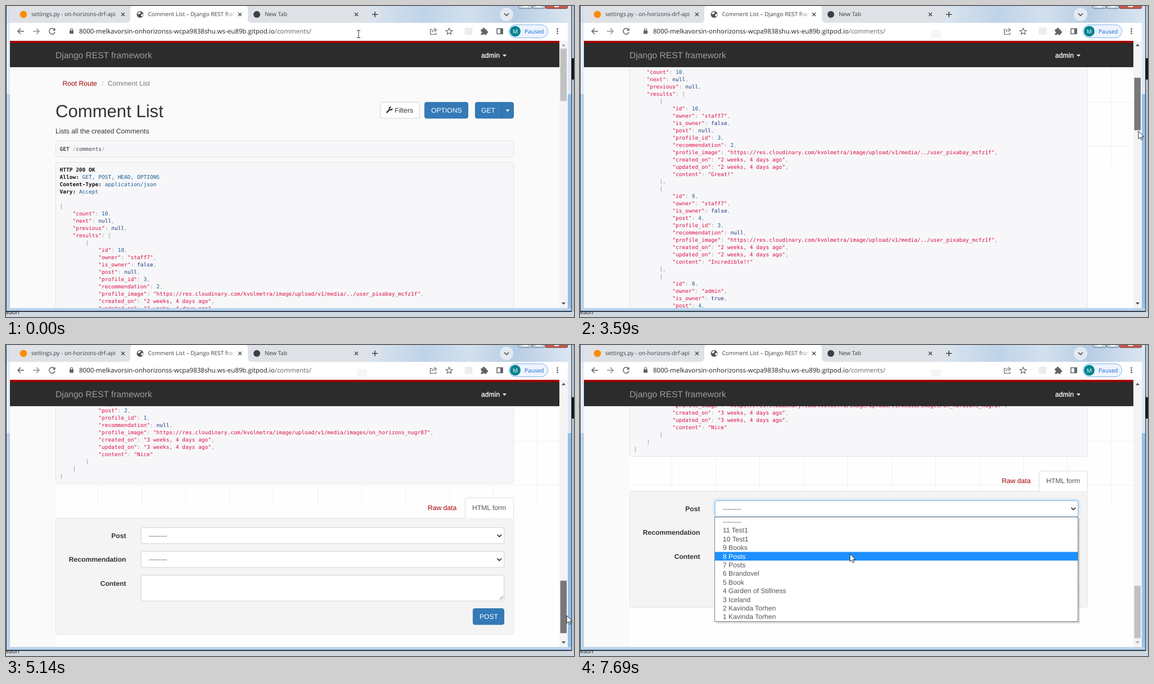
Animation of 1010x554 px, one loop 8 s. Source, as an HTML page:

```html
<!DOCTYPE html>
<html lang="en">
<head>
<meta charset="utf-8">
<title>Comment List</title>
<style>
  html, body { margin: 0; width: 100%; height: 100%; overflow: hidden; background: #fafafa; }
  svg { display: block; width: 1010px; height: 554px; }
  text { font: 12.13px "Liberation Sans", Arial, sans-serif; white-space: pre; text-rendering: geometricPrecision; }
  .ui { font: 10.1px "Open Sans", "Noto Sans", sans-serif; }
  .url { font: 11.5px "Open Sans", "Noto Sans", sans-serif; }
  .code { font: 9.53px "DejaVu Sans Mono", monospace; }
  .code .s { fill: #d14; }
  .code .n { fill: #195f91; }
  .code .k { fill: #1e347b; }
  .code .p { fill: #93a1a1; }
  .b { font-weight: bold; }
  .brand { font-size: 15.55px; }
  .h1 { font-size: 31.1px; }
  .end { text-anchor: end; }
  .line { fill: none; stroke: #5f6368; stroke-width: 1.5; }
</style>
</head>
<body>
<svg id="stage" viewBox="0 0 1010 554"></svg>
<script>
const LOOP = 8000, ROW = 15.4, LIST_TOP = 307, END = 1809;
const CHAR = 5.737, BTN = 29.5, EDGE = .87;

const fill = (x, y, w, h, color) =>
  `<rect x="${x}" y="${y}" width="${w}" height="${h}" fill="${color}"/>`;
const box = (x, y, w, h, color, stroke, r = 3.5) =>
  `<rect x="${x + EDGE / 2}" y="${y + EDGE / 2}" width="${w - EDGE}" height="${h - EDGE}" rx="${r}" ` +
  `fill="${color}" stroke="${stroke}" stroke-width="${EDGE}"/>`;
const txt = (x, y, s, color = '#333', cls = '') =>
  `<text x="${x}" y="${y}" fill="${color}" class="${cls}">${s}</text>`;
const dot = (x, y, r, color) => `<circle cx="${x}" cy="${y}" r="${r}" fill="${color}"/>`;
const line = (d, style = '') => `<path class="line" d="${d}" style="${style}"/>`;
const shape = (d, color, extra = '') => `<path d="${d}" fill="${color}" ${extra}/>`;
const button = (x, y, w, s, tx) =>
  box(x, y, w, BTN, '#337ab7', '#2e6da4') + txt(tx, y + 19, s, '#fff');
const cross = x => line(`M${x - 3} 12l6 6m0-6l-6 6`, 'stroke:#3c4043;stroke-width:1.3');

// ---- JSON listing ----
const USER = 'https://res.cloudinary.com/kvolmetra/image/upload/v1/media/';
const IMAGES = { 1: USER + 'images/on_horizons_nugr87', 3: USER + '../user_pixabay_mcfz1f' };

// post, profile, recommendation, age, content
const COMMENTS = [
  [null, 3, 2, '2 weeks, 4 days', 'Great!'],
  [4, 3, null, '2 weeks, 4 days', 'Incredible!!'],
  [4, 1, null, '3 weeks, 3 days', 'Superb!'],
  [null, 1, 2, '3 weeks, 3 days', 'Amazing!'],
  [3, 1, null, '3 weeks, 3 days', 'Lovely!'],
  [null, 1, 1, '3 weeks, 4 days', 'Nice!'],
  [2, 1, null, '3 weeks, 4 days', 'Good'],
  [2, 1, null, '3 weeks, 4 days', 'Great'],
  [null, 1, 1, '3 weeks, 4 days', 'Lovely'],
  [2, 1, null, '3 weeks, 4 days', 'Nice']
];
const results = COMMENTS.map(([post, profile, rec, age, content], i) => ({
  id: 10 - i,
  owner: profile === 3 ? 'staff7' : 'admin',
  is_owner: profile !== 3,
  post,
  profile_id: profile,
  recommendation: rec,
  profile_image: IMAGES[profile],
  created_on: age + ' ago',
  updated_on: age + ' ago',
  content
}));
const body = JSON.stringify({ count: 10, next: null, previous: null, results }, null, 4);

const paint = s => s.replace(/"[^"]*"|\d+|null|true|false|[{}[\]:,]+/g, m => {
  const c = m[0] === '"' ? 's' : /\d/.test(m) ? 'n' : /\w/.test(m) ? 'k' : 'p';
  return `<tspan class="${c}">${m}</tspan>`;
});
const codeLine = (s, i) => {
  const text = s.trimStart();
  return txt(95.5 + (s.length - text.length) * CHAR, 359.5 + i * 13, paint(text), '#48484c', 'code');
};
const header = (y, key, value) =>
  txt(95.5, y, `<tspan class="b">${key}</tspan> <tspan class="n">${value}</tspan>`, '#111', 'code');

const listing =
  box(88, 278, 815, 1730, '#f7f7f9', '#e1e1e8') +
  header(294.5, 'HTTP 200 OK', '') +
  header(307.5, 'Allow:', 'GET, POST, HEAD, OPTIONS') +
  header(320.5, 'Content-Type:', 'application/json') +
  header(333.5, 'Vary:', 'Accept') +
  body.split('\n').map(codeLine).join('');

// ---- page ----
const head =
  txt(100.5, 142, 'Root Route', '#a30000') + txt(170.5, 142, '/', '#ccc') +
  txt(181, 142, 'Comment List', '#777') +
  txt(88, 198, 'Comment List', '#333', 'h1') +
  txt(88, 227, 'Lists all the created Comments') +
  box(665, 171, 71, BTN, '#fff', '#ccc') + txt(691, 190, 'Filters') +
  line('M677.4 189.4l5-5', 'stroke:#333;stroke-width:2.6;stroke-linecap:round') +
  line('M684.6 180.2A2.5 2.5 0 1 0 686.6 182.4', 'stroke:#333;stroke-width:2.1') +
  button(744, 171, 78, 'OPTIONS', 756) + button(834, 171, 69, 'GET', 845) +
  fill(881, 171, 1, BTN, '#2e6da4') + shape('M888.5 184.5h7l-3.5 3.7z', '#fff') +
  box(88, 240, 815, 29, '#f7f7f9', '#e1e1e8') +
  txt(95.5, 257.5, '<tspan class="b">GET</tspan> <tspan class="p">/</tspan>comments<tspan class="p">/</tspan>', '#48484c', 'code');

const select = (y, id = '') =>
  `<g ${id}>` + box(239.7, y, 646.5, BTN, '#fff', '#ccc') + '</g>' +
  txt(254, y + 18.7, '--------', '#555') +
  line(`M873.5 ${y + 13}l3.8 3.8 3.8-3.8`, 'stroke:#333;stroke-width:1.7');

const form =
  txt(750, 246, 'Raw data', '#a30000') +
  box(88, 260, 815, 208, '#f4f4f4', '#e3e3e3') +
  shape('M816.5 260.5V228a3.5 3.5 0 0 1 3.5-3.5h79a3.5 3.5 0 0 1 3.5 3.5v32.5', '#fff', 'stroke="#ddd"') +
  txt(829, 246, 'HTML form', '#555') +
  txt(213.5, 296, 'Post', '#333', 'b end') +
  txt(213.5, 338, 'Recommendation', '#333', 'b end') +
  txt(213.5, 381, 'Content', '#333', 'b end') +
  select(276.8, 'id="post"') + select(319.2) +
  box(239.7, 361.7, 646.5, 46.8, '#fff', '#ccc') +
  line('M877.5 405.5l6.5-6.5m-3 6.5l3-3', 'stroke:#666;stroke-width:1') +
  button(830, 421, 56, 'POST', 842);

const gridX = Array.from({ length: 11 }, (_, i) => `M${Math.round(163 + 78.1 * i) + .5} 109V284`).join('');
const grid = fill(88, 109, 896, 429, '#fefefe') +
  `<path d="${gridX}M88 171.5H984M88 249.5H984" stroke="#f0f0f1" fill="none"/>`;

const navbar =
  fill(7, 62, 977, 47, '#2c2c2c') + fill(7, 62, 977, 4, '#a30000') +
  txt(88, 93, 'Django REST framework', '#9d9d9d', 'brand') +
  txt(845, 92, 'admin', '#fff" stroke="#fff" stroke-width=".3') +
  shape('M883 86.5h7l-3.5 3.7z', '#fff');

const scrollbar = fill(984, 62, 15, 476, '#f4f4f4') +
  '<path id="up" d="M988 71.5h7l-3.5-4z"/><path id="down" d="M988 528h7l-3.5 4z"/>' +
  '<rect id="thumb" x="985.6" width="11.4" height="93.5"/>';

// ---- browser window ----
const frame =
  fill(0, 0, 1010, 554, '#b3c0ce') + fill(1006, 93, 4, 38, '#15181c') +
  fill(0, 545, 1010, 9, '#d0d8df') +
  fill(0, 0, 1006, 545, '#2d3a48') + fill(1, 0, 1004, 543, 'url(#glass)') +
  fill(1, 30, 6, 127, '#e3ecf5') + fill(999, 30, 6, 127, '#dfe9f3') +
  fill(1, 157, 6, 386, '#bad1e9') + fill(999, 157, 6, 386, '#96c1ea') +
  fill(1, 538, 1004, 5, '#b9d3ec') +
  txt(0, 549, 'eaun', '#222', 'ui') +
  fill(7, 30, 992, 508, '#fafafa');

const tabs =
  shape('M7 30V0H216q5 0 5 6V30z', '#dee1e6') + shape('M430 30V0H636q5 0 5 6V30z', '#dee1e6') +
  shape('M214 30q7 0 7-7V5q0-5 5-5H425q5 0 5 5V23q0 7 7 7z', '#fff') +
  dot(31, 15, 6.3, '#ff8a00') + txt(45, 18, 'settings.py - on-horizons-drf-api', '#3c4043', 'ui') +
  dot(238.5, 15, 6, '#4d5156') + shape('M234 13q3-4 6-2l-2 3-3 1zM240 15l4-1q0 4-3 5z', '#fff') +
  txt(252.5, 18, 'Comment List – Django REST fram', '#3c4043', 'ui') +
  fill(392, 5, 16, 20, 'url(#fade)') + fill(408, 5, 20, 20, '#fff') +
  dot(446, 15, 6, '#3c4043') + txt(460, 18, 'New Tab', '#3c4043', 'ui') +
  [208, 416, 623].map(cross).join('') +
  dot(656, 15, 12, '#dbe2ea') + line('M651 15h10m-5-5v10', 'stroke:#3c4043') +
  dot(890, 15, 12, '#e3e9f0') + line('M886 13.3l4 4 4-4', 'stroke:#3c4043') +
  box(911, -6, 25, 11, '#c3d2e2', '#5d6b7a', 2) + box(936, -6, 23, 11, '#c3d2e2', '#5d6b7a', 2) +
  box(959, -6, 40, 11, '#c9574a', '#6b3532', 2) +
  fill(919, 0, 9, 2, '#fff') + fill(943, 0, 9, 2, '#fff') + fill(975, 0, 8, 2, '#fff');

const toolbar =
  fill(7, 30, 992, 32, '#fff') +
  line('M32 45H21m5-5l-5 5 5 5') + line('M48 45h11m-5-5l5 5-5 5', 'stroke:#8c9094') +
  line('M86.3 42A5.2 5.2 0 1 0 87.1 46.2') + shape('M87.6 39v5h-5z', '#5f6368') +
  fill(113, 43.5, 7, 6, '#5f6368') + line('M114.5 44v-2a2 2 0 0 1 4 0v2', 'stroke-width:1.2') +
  txt(130, 49, '8000-melkavorsin-onhorizonss-wcpa9838shu.ws-eu89b.gitpod.io<tspan fill="#5f6368">/comments/</tspan>', '#202124', 'url') +
  line('M758 41.5h-3.5v9h10v-3M757.5 47q.5-4.5 5.5-4.5M761.5 39.5l4 3.2-4 3.2', 'stroke-width:1.2') +
  line('M788 39.5l1.7 3.8 4.1.4-3.1 2.7.9 4-3.6-2.1-3.6 2.1.9-4-3.1-2.7 4.1-.4z', 'stroke-width:1.2') +
  box(816, 39, 13, 12, '#f4f4f4', '#dadada', 1) +
  line('M819 42h8m-8 3h8m-8 3h8', 'stroke:#ddd;stroke-dasharray:2 1') +
  fill(844.5, 41.5, 10, 10, '#5f6368') + dot(849.5, 41, 2.2, '#5f6368') + dot(855, 46.5, 2.2, '#5f6368') +
  dot(845, 47, 1.6, '#fff') + dot(849.5, 51.5, 1.6, '#fff') +
  line('M873 40.5h10v9h-10z') + fill(879, 40, 4.5, 10, '#5f6368') +
  box(894, 33, 70, 24, '#edf4fe', '#6ea6ee', 11.5) + dot(905.5, 45, 9.5, '#00838f') +
  '<text x="905.5" y="48.5" fill="#fff" class="ui" text-anchor="middle">M</text>' +
  txt(922, 48.5, 'Paused', '#1967d2', 'ui') +
  [41, 45, 49].map(y => dot(980.5, y, 1.4, '#5f6368')).join('');

// ---- drop-down ----
const OPTIONS = ['--------', '11 Test1', '10 Test1', '9 Books', '8 Posts', '7 Posts', '6 Brandovel',
  '5 Book', '4 Garden of Stillness', '3 Iceland', '2 Kavinda Torhen', '1 Kavinda Torhen'];
const menu =
  fill(242, 308, 647, 188, '#0002') + box(239, 306, 647, 187, '#fff', '#6a6a6a', 0) +
  `<rect id="mark" x="240" width="645" height="${ROW}" fill="#1e90ff"/>` +
  OPTIONS.map((s, i) => `<text class="opt" x="254" y="${LIST_TOP + 12 + i * ROW}">${s}</text>`).join('');

const gradient = (id, list) => `<linearGradient id="${id}">` +
  list.map(([o, c, a = 1]) => `<stop offset="${o}" stop-color="${c}" stop-opacity="${a}"/>`).join('') +
  '</linearGradient>';

const stage = document.getElementById('stage');
stage.innerHTML =
  '<defs>' +
  gradient('glass', [[0, '#d3dfeb'], [.63, '#dde6ef'], [.74, '#bfd3e9'], [.82, '#d2e0ee'], [.9, '#b7cde5'], [1, '#dbe6f1']]) +
  gradient('fade', [[0, '#fff', 0], [1, '#fff']]) +
  '<clipPath id="view"><rect x="7" y="109" width="977" height="429"/></clipPath></defs>' +
  frame + tabs + toolbar + '<g id="smudge">' + fill(624, 43, 18, 14, '#f6f6f8') + '</g>' +
  `<g clip-path="url(#view)"><g id="grid">${grid}</g><g id="page">${head}${listing}` +
  `<g transform="translate(0 ${END})">${form}</g></g></g>` +
  navbar + scrollbar + `<g id="menu">${menu}</g>` +
  '<path id="arrow" d="M0 0V13.8L3.2 10.9 5.2 15.6 7.5 14.6 5.5 10H9.8Z" fill="#fff" stroke="#111" stroke-width=".9"/>' +
  '<path id="beam" d="M-3-6.5h2.2l.8.7.8-.7H3M0-6V6M-3 6.5h2.2l.8-.7.8.7H3" fill="none" stroke="#222"/>';

const $ = id => document.getElementById(id);
const opts = stage.querySelectorAll('.opt');

// ---- motion: first change, last change, steps, then the pose reached: x, y, thumb, scroll ----
const START = [627, 50, 0, 0];
const MOVES = [
  [570, 740, 4, 916, 186, 0, 0],
  [1030, 1030, 1, 968, 173, 0, 0],
  [1090, 1090, 1, 1012, 134, 0, 0],
  [1400, 1520, 3, 998, 135, 0, 0],
  [1760, 1950, 4, 993, 148, 0, 0],
  [2560, 2560, 1, 993, 148, 1, 4],
  [2620, 2840, 4, 993, 184, 37, 189],
  [3480, 3590, 3, 993, 223, 52, 252],
  [3670, 3750, 2, 993, 252, 104, 532],
  [4200, 4360, 3, 996, 308, 160, 819],
  [4550, 4550, 1, 996, 330, 170, 860],
  [4620, 4620, 1, 997, 367, 188, 922],
  [4690, 4790, 2, 997, 395, 248, 1270],
  [4940, 5140, 4, 997, 482, 344, 1761],
  [5360, 5550, 4, 997, 498, 353, END],
  [6090, 6270, 4, 765, 375, 353, END],
  [6480, 6710, 5, 698, 290, 353, END],
  [7520, 7690, 4, 480, 372, 353, END]
];

function poseAt(t) {
  let pose = START;
  for (const [from, to, steps, ...goal] of MOVES) {
    if (t < from) break;
    const done = t >= to ? steps : Math.floor((t - from) / (to - from) * (steps - 1)) + 1;
    pose = pose.map((v, i) => v + (goal[i] - v) * done / steps);
  }
  return pose.map(Math.round);
}

const show = (id, on) => $(id).setAttribute('visibility', on ? 'visible' : 'hidden');
const within = (t, a, b) => t >= a && t < b;

function draw(t) {
  const [x, y, thumb, scroll] = poseAt(t);
  const beam = t < 570 || within(t, 6270, 6480);
  for (const id of ['arrow', 'beam']) $(id).setAttribute('transform', `translate(${x} ${y})`);
  show('beam', beam);
  show('arrow', !beam && x < 1010);
  show('smudge', t >= 570);
  show('grid', t >= 2620);

  $('page').setAttribute('transform', `translate(0 ${-scroll})`);
  $('thumb').setAttribute('y', 75.8 + thumb);
  $('thumb').setAttribute('fill',
    within(t, 2260, 5890) ? '#787878' : within(t, 1760, 6090) ? '#a8a8a8' : '#c1c1c1');
  $('up').setAttribute('fill', scroll > 0 ? '#505050' : '#a3a3a3');
  $('down').setAttribute('fill', scroll < END ? '#505050' : '#a3a3a3');

  const focus = t >= 7080;
  $('post').firstChild.setAttribute('stroke', focus ? '#66afe9' : '#ccc');
  $('post').style.filter = focus ? 'drop-shadow(0 0 2.5px #66afe9aa)' : 'none';
  show('menu', t >= 7140);
  const active = Math.max(0, Math.floor((y - LIST_TOP) / ROW));
  $('mark').setAttribute('y', LIST_TOP + active * ROW);
  opts.forEach((o, i) => o.setAttribute('fill', i === active ? '#fff' : '#555'));
}

function tick() {
  draw(performance.now() % LOOP);
  requestAnimationFrame(tick);
}
tick();
</script>
</body>
</html>
```
